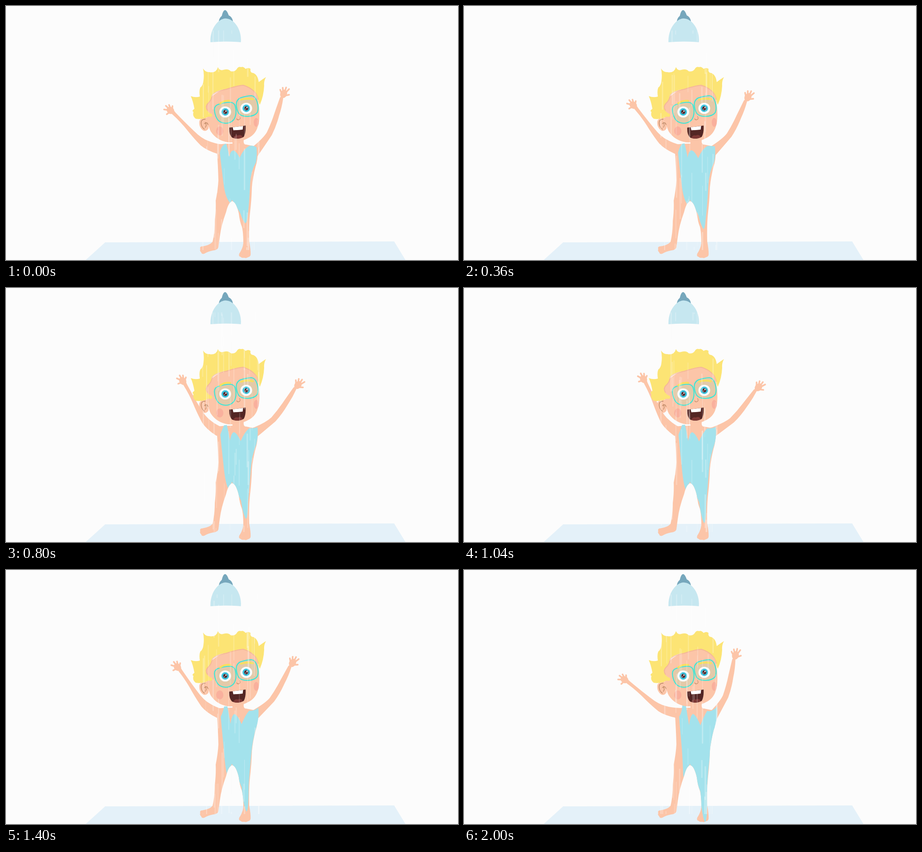
These frames come from a looping animation (998x561 px, 2.04 s). An HTML page:

```html
<!DOCTYPE html>
<html lang="en">
<head>
<meta charset="utf-8">
<title>Shower</title>
<style>
  html, body { margin: 0; width: 100%; height: 100%; overflow: hidden; background: #fcfcfc; }
  svg { display: block; width: 100%; height: 100%; }
  .skin { fill: #fcc5a8; }
  .finger { fill: none; stroke: #fcc5a8; stroke-width: 3.6; stroke-linecap: round; }
  .hair { fill: #fce474; }
  .brow { fill: none; stroke: #f8e05c; stroke-width: 4; stroke-linecap: round; }
  .blush { fill: #f9b09d; }
  .lens { fill: #e3caa9; stroke: #3de6d6; stroke-width: 2.2; }
  .line { fill: none; stroke: #b98460; stroke-width: 1.3; stroke-linecap: round; }
</style>
</head>
<body>
<svg viewBox="0 0 998 561">
  <defs>
    <path id="body" d="M466 306 Q480 304 500 304 L500 290 H526 Q522 306 530 306 L545 309 Q556 308 556 318
      Q556 340 551 355 Q545 378 543 400 Q542 430 539 455 Q536 480 537 520 Q541 542 540 550 Q539 554 534 555
      Q530 558 526 556 Q520 557 518 554 Q513 553 515 547 Q523 535 524 524 Q524 500 521 488 Q516 476 514 458
      Q508 432 499 431 Q491 434 486 455 Q475 485 472 510 Q470 525 469 533 Q467 539 457 540 Q446 542 438 547
      Q432 549 431 544 Q427 541 429 537 Q427 532 432 531 Q449 529 456 521 Q461 500 461 475 Q464 450 463 430
      Q468 405 469 385 Q468 350 466 325 Z"/>
    <clipPath id="wetArea">
      <use href="#body"/>
      <rect x="440" y="290" width="140" height="60"/>
    </clipPath>
    <clipPath id="rainArea"><rect x="420" y="54" width="150" height="485"/></clipPath>
    <g id="eye">
      <ellipse rx="13" ry="12.3" fill="#fafdfd"/>
      <circle r="8.3" fill="#3cc2dd"/>
      <circle r="4.6" fill="#53292d"/>
      <circle cx="1.6" cy="-1.8" r="1.4" fill="#fff"/>
      <circle cx="-1.6" cy="1.8" r="1" fill="#e8c9c9"/>
    </g>
  </defs>

  <path fill="#e4f1f9" d="M219 522 L857 520 L882 561 H176 Z"/>

  <g fill="#76a7bc">
    <path d="M476 24 Q479 9 484 9 Q488 9 493 24 Z"/>
    <path d="M470 34 Q472 20 485 19.5 Q499 20 501 34 Z"/>
  </g>
  <path fill="#c6e7f0" d="M451.5 80 C450 54 466 28 485 27.5 C505 28 521 54 518.5 80 Q485 77 451.5 80 Z"/>

  <g id="armLeft">
    <path class="skin" d="M478 326 L467 326.5 Q443 319 430 308 Q418 296 404 279 Q386 256 368 240
      Q362 234 366 231 Q371 230 374 235 Q394 256 415 276 Q432 293 447 298 Q458 303 478 306 Z"/>
    <ellipse class="skin" cx="363" cy="230.5" rx="9" ry="7.5" transform="rotate(38 363 230.5)"/>
    <path class="finger" d="M367 229 L367.5 221 M364 228 L360 218.500 M361 228 L353 220.5 M359 230 L349 228.5 M362 234 L355 239"/>
  </g>
  <g id="armRight">
    <path class="skin" d="M540 314 L546 310 Q568 292 576 279 Q586 258 593 236 Q600 216 605 202
      Q609 197 612 204 Q609 224 603 242 Q597 265 587 285 Q573 306 553 335 L540 335 Z"/>
    <ellipse class="skin" cx="613" cy="194" rx="7.5" ry="9.5" transform="rotate(22 613 194)"/>
    <path class="finger" d="M609 195 L605.5 185 M612 191 L611 180.5 M615 191 L618.5 180 M617 192 L625 183.5 M616 198 L625 196"/>
  </g>

  <use href="#body" class="skin"/>
  <path id="wet" fill="#a3e2ec" clip-path="url(#wetArea)"/>

  <g>
    <path class="skin" d="M441 222 Q450 185 522 173 Q552 180 557 210 Q562 245 557 263 Q552 283 536 291 Q515 303 490 301
      Q465 297 452 277 Q444 262 441 222 Z"/>
    <path class="skin" d="M449 248 Q432 243 427 254 Q425 266 434 274 Q441 279 447 271 Z"/>
    <path class="line" d="M440 250 Q430 250 431 260 Q432 268 438 272 M438 260 Q444 255 446 262 M440 257 Q444 264 440 268"/>
    <path class="hair" d="M419 249 Q411 243 414 234 Q409 232 416 227 Q413 210 408 199 Q418 203 428 200
      Q426 187 429 180 Q435 176 436 165 Q438 150 435 138 Q441 147 449 146 Q464 149 468 135 Q472 144 480 141
      Q491 138 496 144 Q504 146 509 140 Q513 133 519 135 Q524 133 529 139 Q535 135 540 139 Q538 147 546 148
      Q556 152 558 168 Q566 162 574 157 Q569 166 570 176 Q569 199 560.5 218 Q558 214 557 207 Q554 184 524 174
      Q505 176 486 183 Q458 188 454 198 Q453 208 445 215 Q438 222 444 231 Q449 237 454 238 Q458 244 451 245
      Q446 243 442 247 Q430 251 419 249 Z"/>
    <path fill="none" stroke="#f3b391" stroke-width="2" stroke-opacity=".7"
      d="M557 207 Q554 185 524 175 Q505 177 486 184 Q459 189 455 198 Q454 208 446 215 Q439 222 445 231"/>
    <ellipse class="blush" cx="472" cy="276" rx="8" ry="10"/>
    <ellipse class="blush" cx="552.5" cy="257" rx="5.500" ry="10"/>

    <path class="lens" d="M460 229 Q460 221 468 217.5 Q483 212.5 496 212.5 Q506 214 507 225 Q510 240 503 251
      Q496 259 485 259 Q471 258 466 249 Q461 241 460 229 Z"/>
    <path class="lens" d="M508.5 218 Q508 208 517 203 Q530 198.5 542 198 Q550 199 553.5 209 Q559 224 555 235
      Q549 243.5 533 244 Q518 244 513 236 Q509 228 508.5 218 Z"/>
    <path class="brow" d="M473 215 Q482 208 495 209.5 M519 207 Q531 202.5 545 206"/>
    <use href="#eye" x="484" y="234"/>
    <use href="#eye" x="530.5" y="226"/>

    <path class="line" stroke-opacity=".8" d="M515.5 244 Q519.5 250 513 251.5 Q510 251.5 509.5 249"/>
    <path fill="#532624" d="M493 268.5 Q511 267 529 264 Q530 280 525 289 Q512 296 499 290.5 Q492 283 493 268.5 Z"/>
    <path fill="#7d3835" d="M502 291.5 Q505 284 512 286 Q519 282 523 290 Q512 295 502 291.5 Z"/>
    <path fill="#fff" d="M500.5 267.8 L523.5 265 L522.5 273 Q512 274 502 274.5 Z"/>
  </g>

  <g id="rain" clip-path="url(#rainArea)" fill="#fcfcfc"></g>
</svg>

<script>
const LOOP = 2040, STEP = 40, RUN = 1960;
const byId = id => document.getElementById(id);

// Wet patch at the start and at the end of the loop, same command sequence
const wetFrom = `M472 324 Q474 313 481 306 L486 304 Q490 315 493 333 Q496 319 502 319 Q508 320 516 335
  Q524 316 537 309 Q546 307 553 312 Q555 328 552 345 Q540 366 539 392 Q537 440 533 468
  Q531 480 528 480 Q523 474 517 457 L499 428 L496 436 Q484 425 480 390 Q475 350 472 324 Z`;
const wetTo = `M475 324 Q481 316 482 299 L490 300 Q493 320 497 343 Q500 319 506 318 Q513 321 522 343
  Q530 322 537 311 Q547 315 559 301 Q561 325 554 345 Q546 380 543 410 Q538 450 537 480
  Q538 556 532 557 Q524 540 522 490 L499 428 L484 458 Q484 440 481 395 Q477 350 475 324 Z`;
const wetEnds = wetTo.match(/\d+/g).map(Number);

function wetPath(p) {
  let i = 0;
  return wetFrom.replace(/\d+/g, n => (+n + (wetEnds[i++] - n) * p).toFixed(2));
}

// Arms swing up at one rate, then down a little faster
const PEAK = 960;
const swing = s => s < PEAK ? 20 * s / PEAK : 20 - 26.2 * (s - PEAK) / (RUN - PEAK);

let seed = 11;
const rand = () => (seed = (seed * 16807) % 2147483647) / 2147483647;

const drops = Array.from({ length: 64 }, () => {
  const el = document.createElementNS("http://www.w3.org/2000/svg", "rect");
  const drop = { el, start: rand(), len: 35 + 60 * rand(), laps: 2 + Math.floor(rand() * 2) };
  el.setAttribute("x", 431 + 128 * rand());
  el.setAttribute("width", 1.2 + 2.2 * rand());
  el.setAttribute("height", drop.len);
  el.setAttribute("opacity", 0.14 + 0.18 * rand());
  byId("rain").append(el);
  return drop;
});

function draw(s) {
  const angle = swing(s);
  byId("armLeft").setAttribute("transform", `rotate(${angle} 467 316)`);
  byId("armRight").setAttribute("transform", `rotate(${angle} 556 318)`);
  byId("wet").setAttribute("d", wetPath(s / RUN));
  for (const d of drops) {
    const phase = (d.start + d.laps * s / (RUN + STEP)) % 1;
    d.el.setAttribute("y", 54 - d.len + phase * (485 + d.len));
  }
}

const begin = performance.now();
function tick() {
  const t = (performance.now() - begin) % LOOP;
  // The opening pose is held for two steps
  draw(Math.max(0, Math.floor(t / STEP) - 1) * STEP);
  requestAnimationFrame(tick);
}
tick();
</script>
</body>
</html>
```
